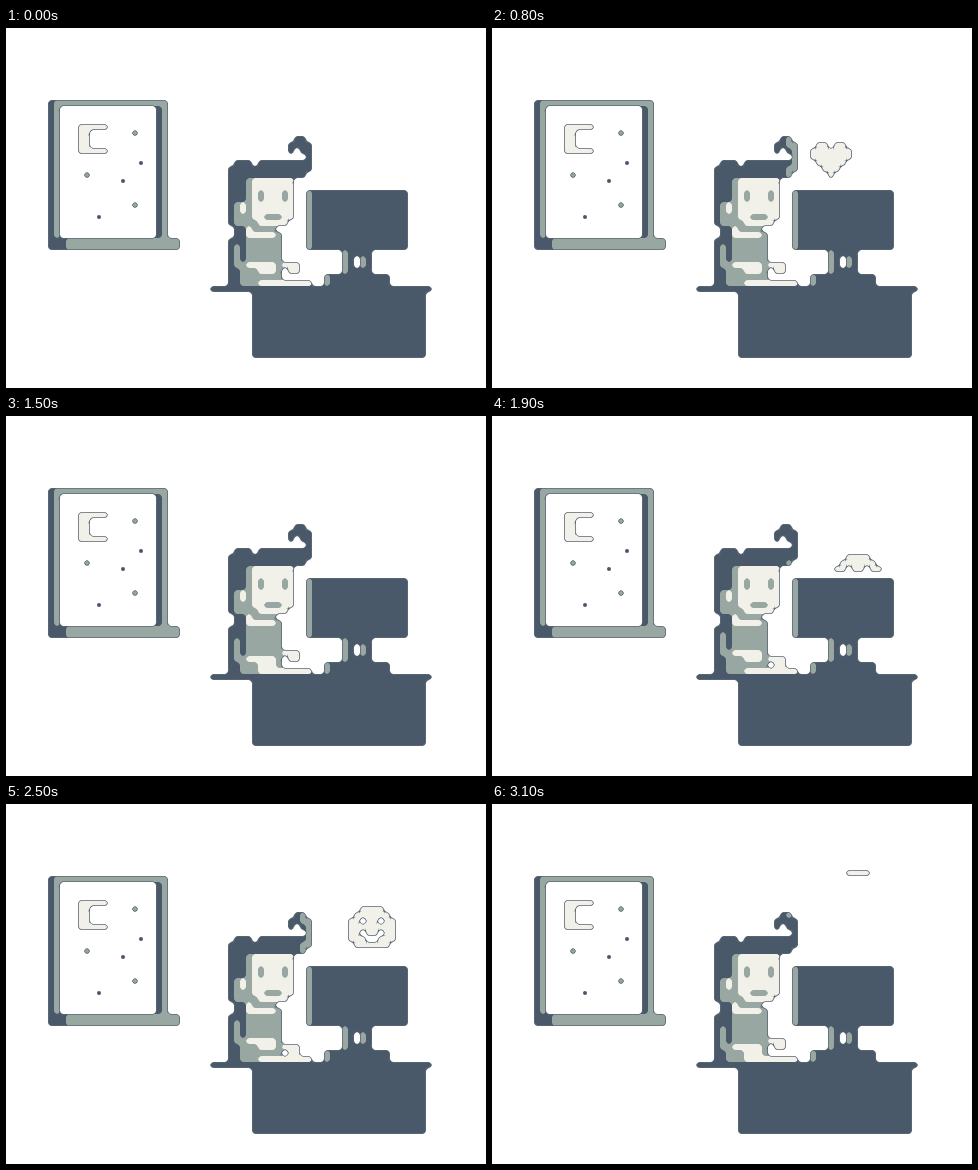
These frames come from a looping animation (480 px wide and 360 px high, 3.2 s). An HTML page with a canvas:

```html
<!DOCTYPE html>
<html lang="en">
<head>
<meta charset="utf-8">
<title>Night desk</title>
<style>
  html, body { margin: 0; width: 100%; height: 100%; overflow: hidden; background: #fff; }
  canvas { display: block; width: 480px; height: 360px; }
</style>
</head>
<body>
<canvas id="stage" width="480" height="360"></canvas>
<script>
const ctx = document.getElementById('stage').getContext('2d');
const COLS = 80, ROWS = 60, CELL = 6;
const NONE = 0, DARK = 1, GREY = 2, LIGHT = 3;
const COLORS = ['#fff', '#49596a', '#98a7a2', '#f2f1e9'];
const STEP = 100, STEPS = 32;

const HEART = ['.##.##.', '#######', '#######', '.#####.', '..###..', '...#...'];
const SMILEY = ['..####..', '.######.', '##.##.##', '########',
                '##.##.##', '###..###', '.######.', '..####..'];

let grid;
const at = (x, y) => x < 0 || y < 0 || x >= COLS || y >= ROWS ? NONE : grid[y * COLS + x];

function box(tone, x, y, w = 1, h = 1) {
  for (let j = y; j < y + h; j++) grid.fill(tone, j * COLS + x, j * COLS + x + w);
}

function drawWindow() {
  box(DARK, 7, 12, 1, 25);
  box(GREY, 8, 12, 19);
  box(GREY, 8, 13, 1, 22);
  box(DARK, 25, 13, 1, 22);
  box(GREY, 26, 13, 1, 22);
  box(DARK, 7, 35, 3, 2);
  box(GREY, 10, 35, 19, 2);
  // moon and stars
  box(LIGHT, 12, 16, 5);
  box(LIGHT, 12, 17, 2, 3);
  box(LIGHT, 12, 20, 5);
  [[21, 17], [13, 24], [21, 29]].forEach(([x, y]) => box(GREY, x, y));
}

function drawDesk() {
  box(DARK, 34, 43, 37);
  box(DARK, 41, 44, 29, 11);
  box(DARK, 50, 27, 17, 10);
  box(GREY, 50, 27, 1, 10);
  box(DARK, 56, 37, 5, 4);
  box(GREY, 56, 37, 1, 4);
  box(NONE, 58, 38, 1, 2);
  box(GREY, 59, 38, 1, 2);
  box(DARK, 53, 41, 11, 2);
  box(GREY, 53, 41, 1, 2);
}

function drawHair() {
  box(DARK, 38, 22, 3);
  box(DARK, 42, 22, 9);
  box(DARK, 37, 23, 14);
  box(DARK, 37, 24, 13);
  box(DARK, 37, 25, 4, 8);
  // curl
  box(DARK, 48, 18, 2);
  box(DARK, 47, 19, 4);
  box(DARK, 47, 20);
  box(DARK, 49, 20, 2);
  box(DARK, 50, 21);
}

function drawPerson(blink) {
  drawHair();
  box(GREY, 40, 25, 1, 9);
  box(GREY, 38, 29, 2, 4);
  box(LIGHT, 39, 29, 1, 2);
  box(DARK, 38, 33, 2, 2);
  // face
  box(LIGHT, 41, 25, 7, 7);
  box(GREY, 41, 32);
  box(LIGHT, 42, 32, 5);
  if (!blink) {
    box(GREY, 42, 27, 1, 2);
    box(GREY, 46, 27, 1, 2);
  }
  box(GREY, 43, 31, 3);
  // collar, back and shirt
  box(GREY, 40, 33, 5);
  box(GREY, 40, 34, 6, 9);
  box(LIGHT, 40, 33);
  box(LIGHT, 40, 34, 5);
  box(DARK, 37, 35, 3, 8);
}

function drawArms(armDown, handDown) {
  const y = armDown ? 40 : 39;
  box(GREY, 38, y - 3, 1, 4);
  box(GREY, 39, y, 1, 43 - y);
  box(LIGHT, 40, y, 5);
  box(LIGHT, 42, y + 1, 3);
  const hand = handDown ? 40 : 39;
  box(LIGHT, 46, hand, 3);
  box(LIGHT, 47, hand + 1, 2);
  box(LIGHT, 42, 42, 9);
}

// Rises one row per step, growing out of the monitor, then wiped from below.
function drawBubble(sprite, x, age) {
  const n = sprite.length, rows = Math.min(age, n, 8 + n - age);
  for (let r = 0; r < rows; r++) {
    [...sprite[r]].forEach((c, i) => { if (c === '#') box(LIGHT, x + i, 26 - age + r); });
  }
}

function drawHairGlow(age) {
  if (age < 1 || age > 13) return;
  const end = Math.min(24, 31 - age);
  for (let y = Math.max(18, 25 - age); y <= end; y++) {
    if (y === 18 || y === 24) box(GREY, 49, y);
    else if (y === 19 || y === 23) box(GREY, 49, y, 2);
    else box(GREY, 50, y);
  }
}

// Outline of the cells where on(x, y) holds, with corners rounded over half a cell.
// joinDiagonals decides whether cells that only touch at a corner are connected.
function tracePath(on, joinDiagonals) {
  const path = new Path2D(), h = CELL / 2, bulge = 0.75 * h;
  const corners = [[-1, -1], [1, -1], [1, 1], [-1, 1]];
  for (let y = 0; y < ROWS; y++) for (let x = 0; x < COLS; x++) {
    const cx = x * CELL + h, cy = y * CELL + h, filled = on(x, y);
    if (filled) path.moveTo(cx, cy - h);
    corners.forEach(([dx, dy], i) => {
      const side = on(x + dx, y), end = on(x, y + dy), diagonal = on(x + dx, y + dy);
      const px = cx + dx * h, py = cy + dy * h;
      const control = [cx + dx * bulge, cy + dy * bulge];
      if (filled) {
        const [from, to] = i % 2 ? [[cx, py], [px, cy]] : [[px, cy], [cx, py]];
        path.lineTo(...from);
        if (side || end || joinDiagonals && diagonal) path.lineTo(px, py);
        else path.quadraticCurveTo(...control, ...to);
        path.lineTo(...to);
      } else if (side && end && (joinDiagonals || diagonal)) {
        path.moveTo(px, py);
        path.lineTo(cx, py);
        path.quadraticCurveTo(...control, px, cy);
        path.closePath();
      }
    });
    if (filled) path.closePath();
  }
  return path;
}

function paint() {
  ctx.fillStyle = COLORS[NONE];
  ctx.fillRect(0, 0, 480, 360);
  for (const tone of [DARK, GREY, LIGHT]) {
    ctx.fillStyle = COLORS[tone];
    ctx.fill(tracePath((x, y) => at(x, y) >= tone, false));
  }
  // a thin line just inside every silhouette, drawn from the empty side
  const empty = tracePath((x, y) => at(x, y) === NONE, true);
  ctx.strokeStyle = '#5d6a76';
  ctx.lineWidth = 1.6;
  ctx.stroke(empty);
  ctx.fillStyle = COLORS[NONE];
  ctx.fill(empty);

  ctx.fillStyle = COLORS[DARK];
  for (const [x, y] of [[135, 135], [117, 153], [93, 189]]) {
    ctx.beginPath();
    ctx.arc(x, y, 2, 0, Math.PI * 2);
    ctx.fill();
  }
}

function render(step) {
  grid = new Uint8Array(COLS * ROWS);
  const beat = step % 8;
  drawWindow();
  drawDesk();
  drawPerson(step === 27);
  drawArms(beat > 5, [1, 3, 5, 6].includes(beat));
  drawHairGlow(step - 1);
  drawHairGlow(step - 18);
  drawBubble(HEART, 53, step - 1);
  drawBubble(SMILEY, 57, step - 16);
  paint();
}

let shown = -1;
const start = performance.now();
function tick() {
  const step = Math.floor((performance.now() - start) / STEP) % STEPS;
  if (step !== shown) render(shown = step);
  requestAnimationFrame(tick);
}
tick();
</script>
</body>
</html>
```
